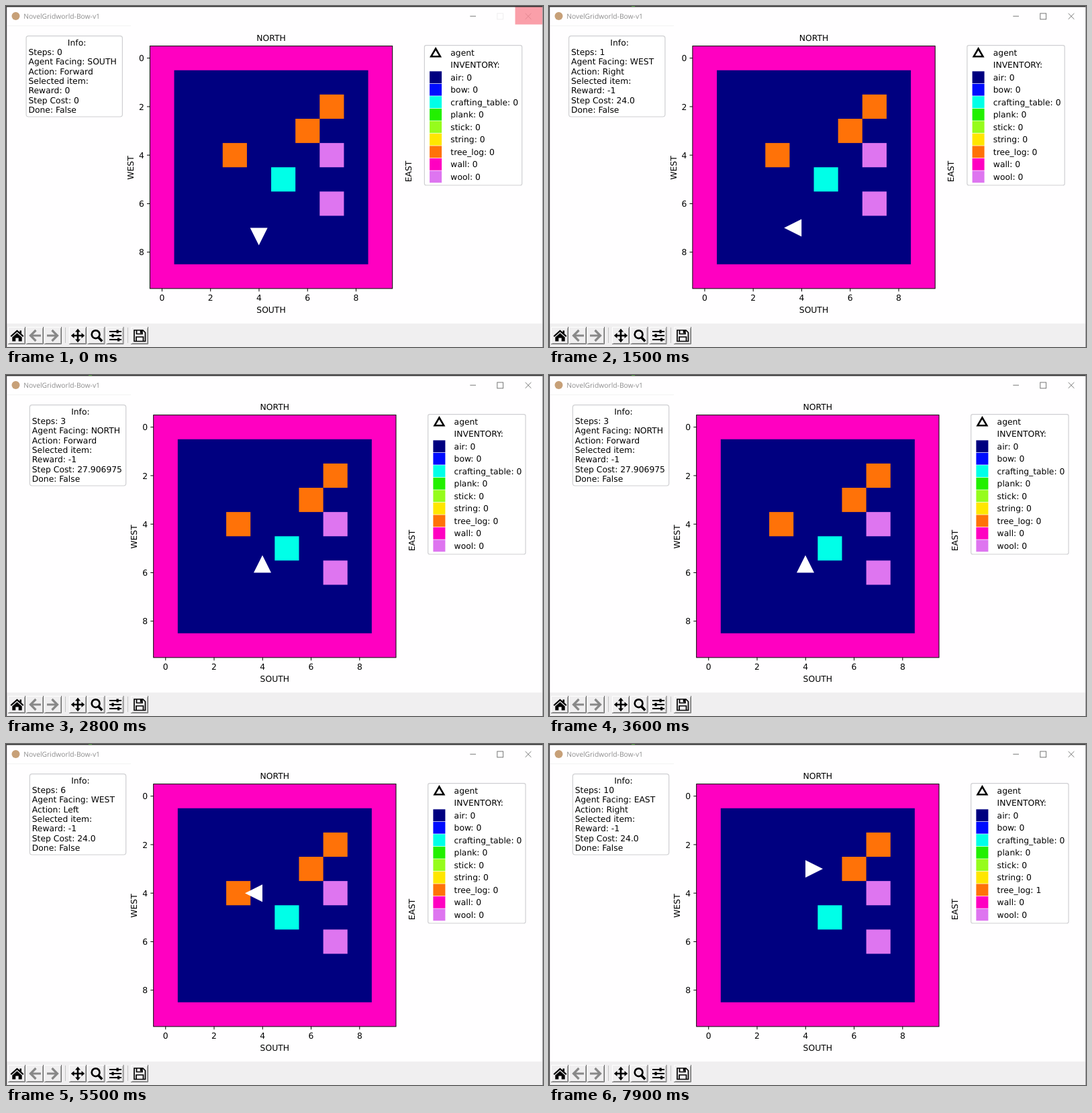
An HTML page for the animation above (8 s loop, 800 by 508 pixels).

```html
<!DOCTYPE html>
<html lang="en">
<head>
<meta charset="utf-8">
<title>NovelGridworld-Bow-v1</title>
<style>
  html, body { margin: 0; width: 100%; height: 100%; overflow: hidden; background: #fffeff; }
  svg { display: block; width: 800px; height: 508px; }
  text { font: 12.33px "DejaVu Sans", sans-serif; text-rendering: geometricPrecision; white-space: pre; }
  .title { font: 10.3px "Open Sans", sans-serif; fill: #8c8c8c; }
  .mid { text-anchor: middle; }
  .end { text-anchor: end; }
  .line { fill: none; stroke: #000; }
  .control { fill: none; stroke: #707070; stroke-width: .95; }
</style>
</head>
<body>
<svg id="stage" viewBox="0 0 800 508" xmlns="http://www.w3.org/2000/svg">
  <rect width="800" height="508" fill="#fffeff"/>
  <path d="M2 29.5H186" stroke="#f3f3f3"/>
  <circle cx="14.5" cy="15" r="6" fill="#c7a078"/>
  <text class="title" x="26.3" y="18.8">NovelGridworld-Bow-v1</text>
  <rect id="hover" x="758.5" y="1" width="40.5" height="26.5" fill="#fa9fa9"/>
  <path class="control" d="M691.3 15.2h8.7"/>
  <rect class="control" id="maximize" x="731.8" y="11" width="8.8" height="8.8"/>
  <path class="control" id="close" d="M773.7 11l8.7 8.7m0-8.7l-8.7 8.7"/>

  <g id="figure"></g>

  <rect x="1" y="473" width="798" height="35" fill="#f0eff0"/>
  <g id="buttons"></g>
  <path d="M88.5 479V502M181.5 479V502" stroke="#c4c4c4"/>
  <path d="M6.5 491.5L16.5 482.5L20.5 486V483.5H23V488.3L26.5 491.5L25 493L16.5 485.5L8 493ZM9.3 493.5L16.5 487.2L23.7 493.5V499.5H18.7V494.5H14.3V499.5H9.3Z"/>
  <g fill="none" stroke="#888" stroke-width="3.2">
    <path d="M36.5 491H52M44.5 483L36.5 491L44.5 499"/>
    <path d="M61 491H76.5M68.5 483L76.5 491L68.5 499"/>
  </g>
  <path d="M99 491H115M107 483V499" stroke="#000" stroke-width="2.6"/>
  <path d="M107 480.8l4 4.7h-8zM107 501.2l4-4.7h-8zM96.8 491l4.7-4v8zM117.2 491l-4.7-4v8z"/>
  <g class="line" stroke-width="2.7">
    <circle cx="133.6" cy="489.2" r="5.9"/>
    <path d="M137.8 493.7L143.2 499.4" stroke-width="3.6"/>
  </g>
  <path d="M154 485H172M154 491H172M154 497H172" stroke="#000" stroke-width="1.8"/>
  <path d="M164.5 482.4h3.2v5.2h-3.2zM157.5 488.4h3.2v5.2h-3.2zM166 494.4h3.2v5.2H166z"/>
  <path class="line" stroke-width="1.7" d="M191 483H204L207.5 486.5V499.5H191ZM194.5 483V488.5H203V483M194 499.5V493H204.5V499.5"/>
  <rect x="199.8" y="483" width="2.2" height="4.5"/>

  <path d="M0 .75H800" stroke="#303030" stroke-width="1.5"/>
  <path d="M.6 0V508" stroke="#454345" stroke-width="1.2"/>
  <path d="M799.6 0V508" stroke="#77757a" stroke-width=".8"/>
  <path id="speck" d="M123 .5h5" stroke="#3c8f2c"/>
</svg>
<script>
const LOOP = 8000;
const CELL = 36.13, LEFT = 219.7, TOP = 59.6, SIZE = CELL * 10;
const ITEMS = {
  air: '#000080', bow: '#000cff', crafting_table: '#00ffe8', plank: '#22f000', stick: '#96fc1c',
  string: '#ffe600', tree_log: '#ff7208', wall: '#ff00c1', wool: '#de75f0'
};
const BLOCKS = [
  ['tree_log', 3, 4], ['tree_log', 6, 3], ['tree_log', 7, 2],
  ['wool', 7, 4], ['wool', 7, 6], ['crafting_table', 5, 5]
];
const ANGLES = { NORTH: 0, EAST: 90, SOUTH: 180, WEST: 270 };
const FORWARD = '27.906975', TURN = '24.0';

// start time, facing, action, reward, step cost, agent row, layout shift
const STEPS = [
  [0, 'SOUTH', 'Forward', 0, '0', 7, -5.3],
  [1300, 'WEST', 'Right', -1, TURN, 7, -5.8],
  [2100, 'NORTH', 'Right', -1, TURN, 7, -2.8],
  [2800, 'NORTH', 'Forward', -1, FORWARD, 6, 0],
  [3700, 'NORTH', 'Forward', -1, FORWARD, 5, 0],
  [4300, 'NORTH', 'Forward', -1, FORWARD, 4, 0],
  [5000, 'WEST', 'Left', -1, TURN, 4, 0],
  [5800, 'WEST', 'Break', 10, '3600.0', 4, 0],
  [6500, 'NORTH', 'Right', -1, TURN, 4, 0],
  [7000, 'NORTH', 'Forward', -1, FORWARD, 3, 0],
  [7500, 'EAST', 'Right', -1, TURN, 3, 0]
];
const BREAK_STEP = 7;

const byId = id => document.getElementById(id);
const figure = byId('figure');

function add(parent, tag, attrs, content = '') {
  const node = document.createElementNS('http://www.w3.org/2000/svg', tag);
  for (const key in attrs) node.setAttribute(key, attrs[key]);
  node.textContent = content;
  parent.append(node);
  return node;
}
const label = (x, y, content, cls = '') => add(figure, 'text', { x, y, class: cls }, content);
const frame = (x, y, width, height, rx) =>
  add(figure, 'rect', { x, y, width, height, rx, fill: '#fff', stroke: '#cfcfd2', 'stroke-width': 1.2 });
const tile = (column, row, span, fill) => add(figure, 'rect', {
  x: LEFT + column * CELL, y: TOP + row * CELL, width: span * CELL, height: span * CELL, fill
});

// Board
tile(0, 0, 10, ITEMS.wall);
tile(1, 1, 8, ITEMS.air);
const blocks = BLOCKS.map(([item, column, row]) => tile(column, row, 1, ITEMS[item]));
const agent = add(figure, 'path', { d: 'M-13 0H13L0 -26Z', fill: '#fff' });
add(figure, 'rect', { x: LEFT, y: TOP, width: SIZE, height: SIZE, class: 'line' });
for (let n = 0; n < 10; n += 2) {
  const offset = (n + 0.5) * CELL;
  add(figure, 'path', { d: `M${LEFT + offset} ${TOP + SIZE}v4.4M${LEFT} ${TOP + offset}h-4.4`, class: 'line' });
  label(LEFT + offset, 439, n, 'mid');
  label(211.2, TOP + offset + 4.6, n, 'end');
}
label(400.3, 52.2, 'NORTH', 'mid');
label(400.3, 456.8, 'SOUTH', 'mid');
for (const [x, y, name] of [[195.3, 241, 'WEST'], [608.8, 246.5, 'EAST']]) {
  label(0, 0, name, 'mid').setAttribute('transform', `translate(${x} ${y}) rotate(-90)`);
}

// Info panel
frame(35.4, 44.6, 143.3, 120.4, 3.5);
label(110.9, 58.6, 'Info:', 'mid');
const infoLines = Array.from({ length: 7 }, (_, i) => label(38.8, 73 + i * 14.33, ''));

// Legend
frame(628.7, 58.6, 145.3, 208.4, 2.5);
add(figure, 'path', { d: 'M645.4 63.5L652.2 75.2H638.6Z', fill: '#fff', stroke: '#000', 'stroke-width': 2.6 });
label(667.6, 73.6, 'agent');
label(667.6, 92.1, 'INVENTORY:');
const counts = {};
Object.entries(ITEMS).forEach(([item, fill], i) => {
  const y = 106.2 + i * 18.52;
  add(figure, 'rect', { x: 636.4, y: y - 8.9, width: 18, height: 17.8, fill });
  counts[item] = label(667.6, y + 4.4, `${item}: 0`);
});

// Toolbar buttons with raised edges
for (const x of [3, 30, 57, 94, 121.5, 149.5, 186]) {
  const edge = (d, stroke) => add(byId('buttons'), 'path', { d, stroke, fill: 'none' });
  edge(`M${x + 0.5} 503V478.5H${x + 25}`, '#fff');
  edge(`M${x + 24.5} 480V502.5H${x + 2}`, '#a8a8a8');
  edge(`M${x + 25.5} 478V503.5H${x}`, '#6c6c6c');
}

function render(time) {
  const index = STEPS.findLastIndex(step => step[0] <= time);
  const [, facing, action, reward, cost, row, shift] = STEPS[index];
  const broken = index >= BREAK_STEP;

  figure.setAttribute('transform', `translate(${shift} 0)`);
  agent.setAttribute('transform',
    `translate(${LEFT + 4.5 * CELL - 0.3} ${TOP + (row + 0.5) * CELL}) rotate(${ANGLES[facing]})`);
  blocks[0].setAttribute('visibility', broken ? 'hidden' : 'visible');
  counts.tree_log.textContent = `tree_log: ${broken ? 1 : 0}`;
  [
    `Steps: ${index}`, `Agent Facing: ${facing}`, `Action: ${action}`, 'Selected item:',
    `Reward: ${reward}`, `Step Cost: ${cost}`, 'Done: False'
  ].forEach((line, i) => { infoLines[i].textContent = line; });

  const fade = Math.min(1, Math.max(0, (time - 50) / 200));
  byId('hover').setAttribute('opacity', 1 - fade);
  byId('maximize').setAttribute('opacity', 0.12 + 0.88 * fade);
  byId('close').style.stroke = fade < 0.5 ? '#e0848f' : '#707070';
  byId('speck').setAttribute('opacity', index ? 1 : 0);
}

const start = performance.now();
function tick() {
  render((performance.now() - start) % LOOP);
  requestAnimationFrame(tick);
}
tick();
</script>
</body>
</html>
```
